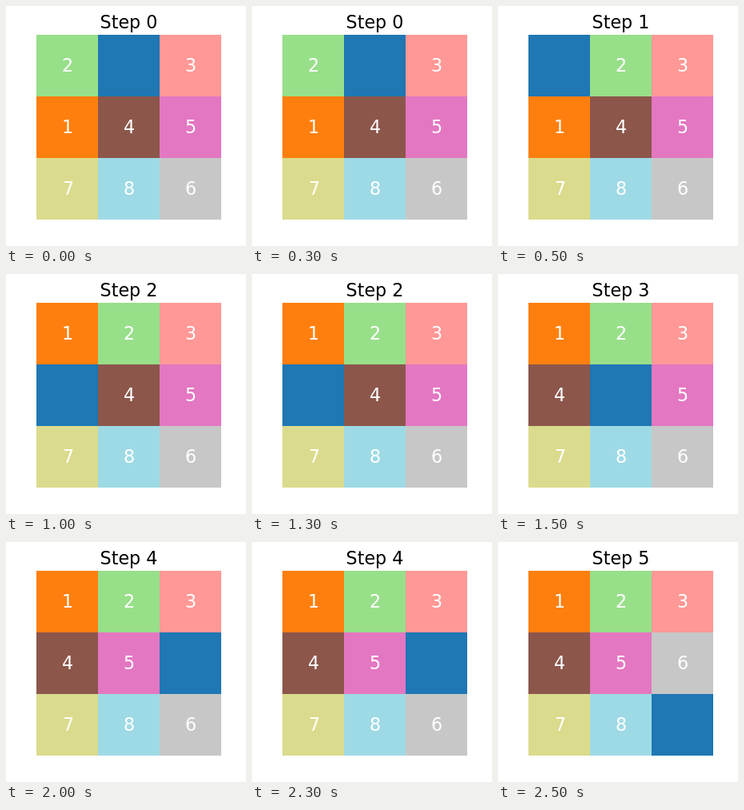
Animation of 300 by 300 pixels, one loop 3 s. Source, as an HTML page with a canvas:

```html
<!DOCTYPE html>
<html lang="en">
<head>
<meta charset="utf-8">
<title>Sliding puzzle</title>
<style>
  html, body { margin: 0; width: 100%; height: 100%; overflow: hidden; background: #fff; }
  canvas { display: block; width: 300px; height: 300px; }
</style>
</head>
<body>
<canvas id="stage" width="300" height="300"></canvas>
<script>
const STEP_MS = 500, CELL = 77, LEFT = 38, TOP = 36;
const COLORS = ['#1f77b4', '#ff7f0e', '#98df8a', '#ff9896', '#8c564b',
                '#e377c2', '#c7c7c7', '#dbdb8d', '#9edae5'];
const START = [2, 0, 3, 1, 4, 5, 7, 8, 6];
const BLANK_PATH = [1, 0, 3, 4, 5, 8];

const ctx = document.getElementById('stage').getContext('2d');

// Replay the blank's moves up to the given step.
function boardAt(step) {
  const board = [...START];
  for (let i = 1; i <= step; i++) {
    const from = BLANK_PATH[i - 1], to = BLANK_PATH[i];
    [board[from], board[to]] = [board[to], board[from]];
  }
  return board;
}

function drawTile(value, index) {
  const x = LEFT + index % 3 * CELL;
  const y = TOP + Math.floor(index / 3) * CELL;
  ctx.fillStyle = COLORS[value];
  ctx.fillRect(x, y, CELL, CELL);
  if (!value) return;
  ctx.fillStyle = '#fff';
  ctx.fillText(value, x + (value === 7 ? 40 : 39), y + 46);
}

function draw(step) {
  ctx.fillStyle = '#fff';
  ctx.fillRect(0, 0, 300, 300);
  ctx.font = '22.22px "DejaVu Sans", sans-serif';
  ctx.textAlign = 'center';
  ctx.fillStyle = '#000';
  ctx.fillText(`Step ${step}`, LEFT + CELL * 1.5, 28);
  boardAt(step).forEach(drawTile);
}

function tick() {
  draw(Math.floor(performance.now() / STEP_MS) % BLANK_PATH.length);
  requestAnimationFrame(tick);
}
tick();
</script>
</body>
</html>
```
